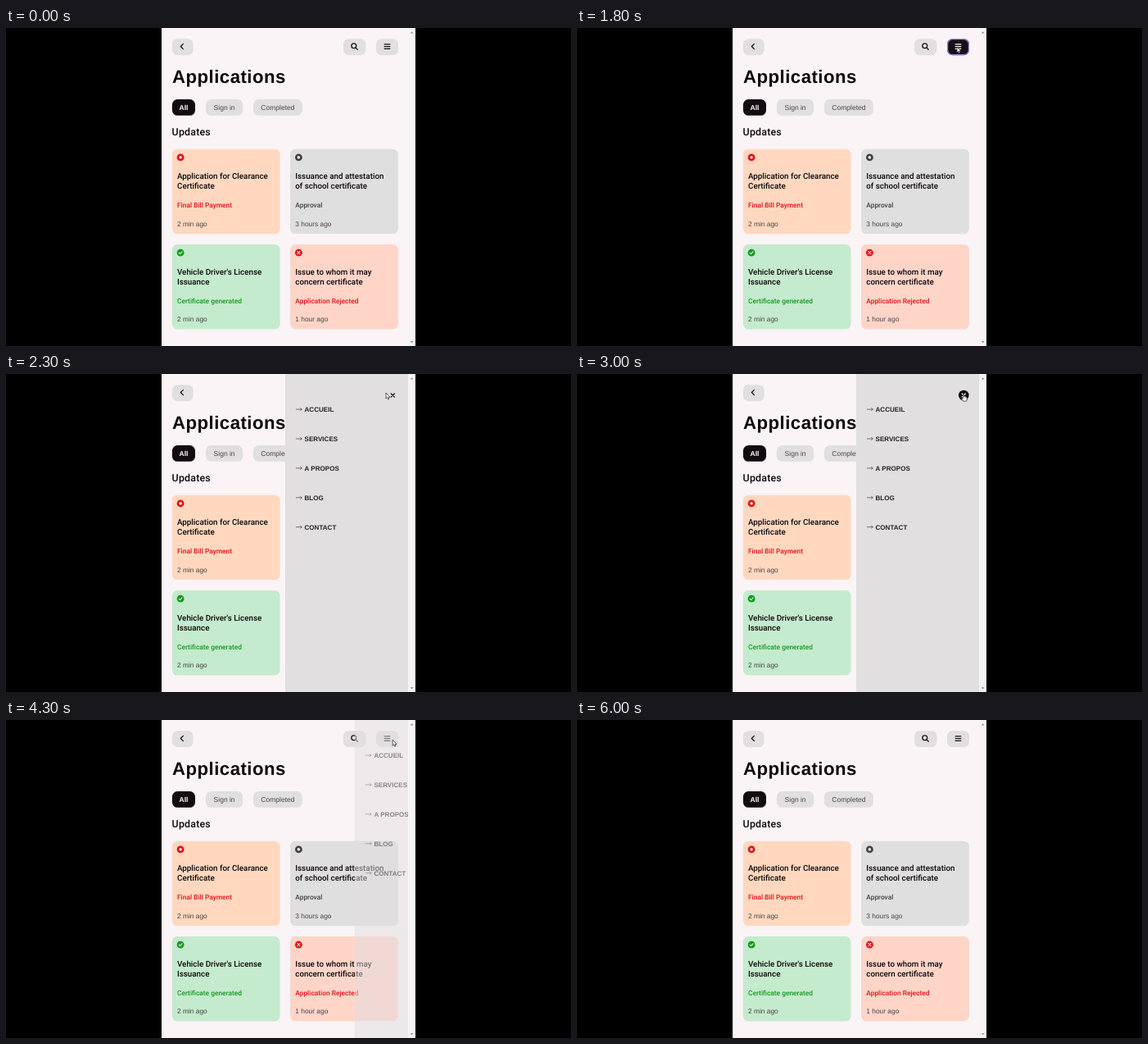
Recreate the animation shown at these times as an HTML page. Size 690 px wide and 388 px high, loop 6.9 s.

```html
<!DOCTYPE html>
<html lang="en">
<head>
<meta charset="utf-8">
<title>Applications</title>
<style>
  html, body { margin: 0; width: 100%; height: 100%; overflow: hidden; background: #000; }
  svg { display: block; width: 100%; height: 100%; }
  text { font-family: Roboto, "Liberation Sans", sans-serif; fill: #0c060a; text-rendering: geometricPrecision; }
  .h1, .nav, .pill, .time { font-family: "Liberation Sans", Arial, sans-serif; }
  .h1 { font-size: 22.2px; font-weight: 700; letter-spacing: .48px; }
  .h2 { font-size: 12.4px; font-weight: 500; letter-spacing: .2px; }
  .pill { font-size: 8.5px; fill: #4a4649; text-anchor: middle; }
  .pill.on { fill: #fff; font-weight: 700; }
  .title { font-size: 9.8px; font-weight: 500; }
  .state { font-size: 8.4px; font-weight: 500; }
  .time { font-size: 8.4px; fill: #4a4448; }
  .nav { font-size: 8px; font-weight: 700; letter-spacing: .05px; fill: #242023; }
  .line { fill: none; stroke: #171216; stroke-width: 1.3; stroke-linecap: round; stroke-linejoin: round; }
</style>
</head>
<body>
<svg id="stage" viewBox="0 0 690 388"></svg>
<script>
const LOOP = 6900, STEP = 100;
const PANEL_X = 341, PANEL_W = 150;
const INK = [22, 16, 20], GREY = [225, 223, 224], WHITE = [255, 255, 255];

const box = (x, y, w, h, fill, r = 6.5) =>
  `<rect x="${x}" y="${y}" width="${w}" height="${h}" rx="${r}" fill="${fill}"/>`;
const text = (x, y, cls, str, extra = '') =>
  `<text x="${x}" y="${y}" class="${cls}" ${extra}>${str}</text>`;
const line = (d, extra = '') => `<path class="line" d="${d}" ${extra}/>`;

const pill = (x, w, label, on) =>
  box(x, 87, w, 19.8, on ? '#120c10' : '#e1dfe0') +
  text(x + w / 2, 99.6, on ? 'pill on' : 'pill', label);

const marks = {
  dot: () => box(-1.6, -1.6, 3.2, 3.2, '#fff0e8', 1.1),
  check: () => line('M-1.9 .1L-.5 1.5L2 -1.3', 'style="stroke:#d8f3de;stroke-width:1.1"'),
  cross: () => line('M-1.5 -1.5L1.5 1.5M1.5 -1.5L-1.5 1.5', 'style="stroke:#fff;stroke-width:1.1"')
};

function card(x, y, bg, color, mark, lines, state, time) {
  return `<g transform="translate(${x} ${y})">` +
    box(0, 0, 131.8, 103.6, bg) +
    `<g transform="translate(10.3 10.2)"><circle r="4.4" fill="${color}"/>${marks[mark]()}</g>` +
    lines.map((s, i) => text(6.2, 36.6 + i * 12.2, 'title', s)).join('') +
    text(6.2, 71.7, 'state', state, `style="fill:${color}"`) +
    text(6.2, 94.4, 'time', time) + '</g>';
}

const navItem = (label, i) =>
  `<g transform="translate(13 ${43.1 + i * 35.9})">` +
  line('M.3 0H7.2M5.5 -1.5L7.2 0L5.5 1.5', 'style="stroke-width:.65;stroke:#3a3639"') +
  text(10.5, 2.9, 'nav', label) + '</g>';

document.getElementById('stage').innerHTML = `
  <defs><clipPath id="view"><rect x="190" y="0" width="301.3" height="388"/></clipPath></defs>
  <rect width="690" height="388" fill="#000"/>
  <rect x="190" y="0" width="310" height="388" fill="#faf4f6"/>
  ${box(202.9, 13.2, 25.7, 20, '#e1dfe0')}${line('M216.4 19.4L213.3 22.5L216.4 25.6')}
  ${box(412, 13.2, 27.4, 20, '#e1dfe0')}
  <circle class="line" cx="424.8" cy="21.8" r="2.9"/>${line('M427 24.1L429.2 26.3')}
  <rect id="menuBtn" x="452" y="13.2" width="27" height="20" rx="6.5"/>
  <rect id="ring" x="452.6" y="13.7" width="25.8" height="19" rx="6" fill="none" stroke="#a283dc" stroke-width="1.2"/>
  ${line('M462.2 19.9H468.8M462.2 22.6H468.8M462.2 25.3H468.8', 'id="bars"')}
  ${text(203, 66.8, 'h1', 'Applications')}
  ${pill(202.9, 28.1, 'All', true)}${pill(243.9, 45.4, 'Sign in')}${pill(302, 59.8, 'Completed')}
  ${text(202.6, 130.6, 'h2', 'Updates')}
  ${card(202.8, 147.7, '#ffd8bf', '#e80d17', 'dot', ['Application for Clearance', 'Certificate'], 'Final Bill Payment', '2 min ago')}
  ${card(347.1, 147.7, '#dfdfdf', '#454144', 'dot', ['Issuance and attestation', 'of school certificate'], 'Approval', '3 hours ago')}
  ${card(202.8, 264, '#c4ebcd', '#149a1e', 'check', ['Vehicle Driver\'s License', 'Issuance'], 'Certificate generated', '2 min ago')}
  ${card(347.1, 264, '#ffd5c8', '#e80d17', 'cross', ['Issue to whom it may', 'concern certificate'], 'Application Rejected', '1 hour ago')}
  <g clip-path="url(#view)"><g id="panel">
    <rect width="${PANEL_W + 1}" height="388" fill="#e1dfe0"/>
    ${['ACCUEIL', 'SERVICES', 'A PROPOS', 'BLOG', 'CONTACT'].map(navItem).join('')}
    <circle id="disc" cx="131.3" cy="26" r="6.3" fill="#100b0e"/>
    ${line('M129.3 24L133.3 28M133.3 24L129.3 28', 'id="cross"')}
  </g></g>
  <rect x="491.3" y="0" width="8.7" height="388" fill="#f7f4f6"/>
  <path d="M493.8 6.4L495.6 4.2L497.4 6.4ZM493.8 382.2L495.6 384.4L497.4 382.2Z" fill="#8b888b"/>
  <g id="cursor" fill="#fff" stroke="#222" stroke-width=".7" stroke-linejoin="round">
    <path id="arrow" d="M0 0V7L1.6 5.6L2.7 8L3.8 7.5L2.8 5.2H4.9Z"/>
    <path id="hand" d="M-.7 .6Q0 -.3 .7 .6V3.3L3.8 4.1Q4.6 4.4 4.4 5.4L3.7 8.8H-.3L-2.4 5.9Q-2.2 4.8 -.7 5.6Z"/>
  </g>`;

const el = id => document.getElementById(id);
const [menuBtn, ring, bars, panel, disc, cross, cursor, arrow, hand] =
  ['menuBtn', 'ring', 'bars', 'panel', 'disc', 'cross', 'cursor', 'arrow', 'hand'].map(el);

// [time, value...] rows, linear in between
const HOVER = [[1000, 0], [1100, .3], [1300, 1], [1800, 1], [1900, .75], [2000, .3], [2100, .06], [2200, 0],
  [4400, 0], [4700, 1], [4800, 1], [4900, .7], [5000, .28], [5200, 0]];
const CLOSE_HOVER = [[2700, 0], [2800, .35], [3000, 1], [4100, 1], [4200, 0]];
const POINTER = [[1100, 463.4, 22.4], [1400, 463.4, 22.4], [1500, 464, 23], [2700, 464, 23], [2800, 468, 24],
  [2900, 472, 24.3], [4700, 472.2, 24.2], [4800, 452, 38], [5000, 362, 89.3], [5100, 335, 108],
  [5200, 319, 121], [5400, 311, 131], [5700, 292, 114]];

function at(rows, t) {
  const n = rows.findIndex(r => r[0] > t);
  if (n < 0) return rows[rows.length - 1].slice(1);
  if (n === 0) return rows[0].slice(1);
  const a = rows[n - 1], b = rows[n], k = (t - a[0]) / (b[0] - a[0]);
  return a.slice(1).map((v, i) => v + (b[i + 1] - v) * k);
}

// CSS ease-in-out, cubic-bezier(.42, 0, .58, 1)
function ease(x) {
  if (x <= 0) return 0;
  if (x >= 1) return 1;
  let lo = 0, hi = 1, s;
  for (let i = 0; i < 20; i++) {
    s = (lo + hi) / 2;
    if (1.26 * s * (1 - s) ** 2 + 1.74 * s * s * (1 - s) + s ** 3 < x) lo = s; else hi = s;
  }
  return s * s * (3 - 2 * s);
}

const mix = (a, b, k) => `rgb(${a.map((v, i) => Math.round(v + (b[i] - v) * k))})`;
const show = (node, on) => node.setAttribute('visibility', on ? 'visible' : 'hidden');

function openness(t) {
  if (t < 1800 || t >= 4700) return 0;
  return t < 4100 ? (t >= 2300 ? 1 : ease((t - 1738) / 600)) : 1 - ease((t - 3977) / 600);
}

function draw(t) {
  const [hover] = at(HOVER, t), [near] = at(CLOSE_HOVER, t), [x, y] = at(POINTER, t);
  const open = openness(t), onClose = t >= 2900 && t < 4100;
  menuBtn.setAttribute('fill', mix(GREY, INK, hover));
  bars.style.stroke = mix(INK, WHITE, hover ** 2);
  show(ring, t >= 1800 && t < 2000);
  panel.setAttribute('transform', `translate(${PANEL_X + PANEL_W * (1 - open)} 0)`);
  panel.setAttribute('opacity', open ** .8);
  disc.setAttribute('opacity', near);
  cross.style.stroke = mix(INK, WHITE, near);
  cursor.setAttribute('transform', `translate(${x} ${y})`);
  const seen = t >= 1100 && t < 6000;
  show(arrow, seen && !onClose);
  show(hand, seen && onClose);
}

const start = performance.now();
function tick(now) {
  const t = Math.max(0, now - start) % LOOP;
  draw(Math.floor(t / STEP) * STEP);
  requestAnimationFrame(tick);
}
draw(0);
requestAnimationFrame(tick);
</script>
</body>
</html>
```
